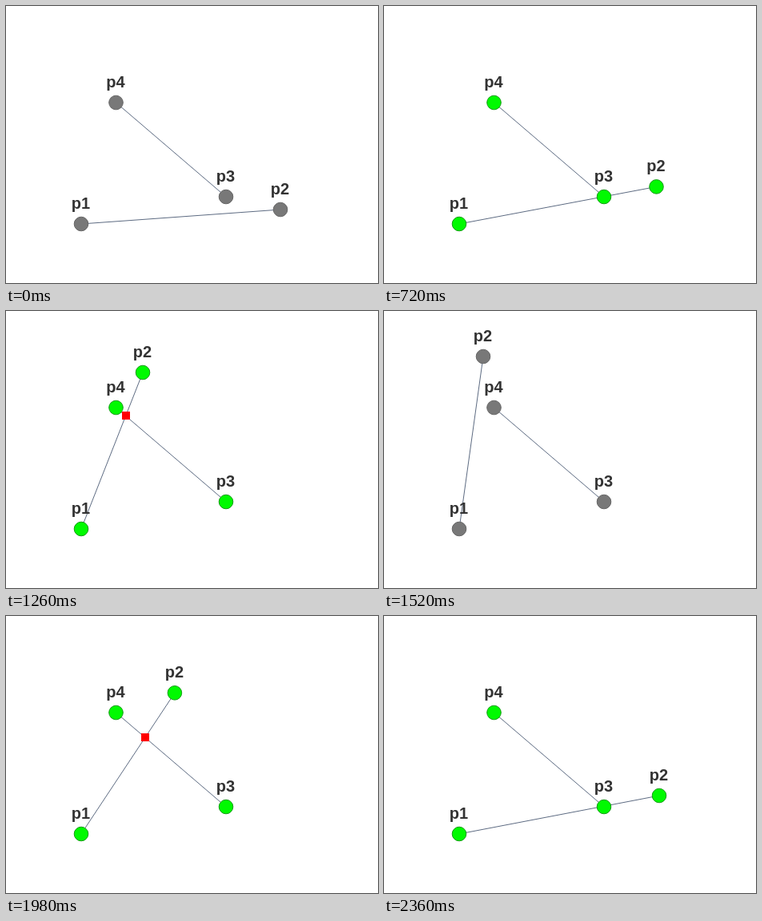
Write an HTML page with a canvas that moves like this. It is 465 px wide and 347 px high and loops after 2.38 s.

```html
<!DOCTYPE html>
<html lang="en">
<head>
<meta charset="utf-8">
<title>Segment intersection</title>
<style>
  html, body { margin: 0; height: 100%; overflow: hidden; background: #fff; }
  canvas { display: block; }
</style>
</head>
<body>
<canvas id="stage" width="465" height="347"></canvas>
<script>
const ctx = document.getElementById('stage').getContext('2d');
const LOOP = 2380, STEP = 20;
const p1 = [94, 273], p3 = [275, 239], p4 = [137.5, 121];

// Path of the dragged point: time, x, y
const drag = [
  [540, 343, 255], [640, 344, 244], [720, 340.5, 226.4], [1020, 265, 136],
  [1080, 242, 113], [1260, 171, 77], [1520, 124, 57], [1660, 124, 57],
  [1820, 137, 62.4], [2140, 304, 150], [2200, 322, 171], [2360, 344, 225]
];

const slope = (i, axis) =>
  (drag[i + 1][axis] - drag[i][axis]) / (drag[i + 1][0] - drag[i][0]);

// Harmonic mean of the neighbouring slopes avoids overshoot
function tangent(i, axis) {
  if (i === 0) return 0;
  const a = slope(i - 1, axis);
  if (i === drag.length - 1) return a;
  const b = slope(i, axis);
  return a * b > 0 ? 2 * a * b / (a + b) : 0;
}

function dragAt(t) {
  if (t <= drag[0][0]) return drag[0].slice(1);
  const last = drag.length - 1;
  if (t >= drag[last][0]) return drag[last].slice(1);
  const i = drag.findIndex(key => key[0] > t) - 1;
  const span = drag[i + 1][0] - drag[i][0];
  const u = (t - drag[i][0]) / span, v = 1 - u;
  return [1, 2].map(axis =>
    drag[i][axis] * v * v * (1 + 2 * u) +
    drag[i + 1][axis] * u * u * (3 - 2 * u) +
    span * u * v * (v * tangent(i, axis) - u * tangent(i + 1, axis)));
}

function intersection(a, b, c, d) {
  const [rx, ry] = [b[0] - a[0], b[1] - a[1]];
  const [sx, sy] = [d[0] - c[0], d[1] - c[1]];
  const [qx, qy] = [c[0] - a[0], c[1] - a[1]];
  const cross = rx * sy - ry * sx;
  const u = (qx * sy - qy * sx) / cross;
  const v = (qx * ry - qy * rx) / cross;
  const inside = u >= 0 && u <= 1 && v >= 0 && v <= 1;
  return inside ? [a[0] + u * rx, a[1] + u * ry] : null;
}

function line(a, b) {
  ctx.strokeStyle = '#5d6b82';
  ctx.beginPath();
  ctx.moveTo(...a);
  ctx.lineTo(...b);
  ctx.stroke();
}

function dot([x, y], name, hit) {
  ctx.fillStyle = hit ? '#00fa00' : '#787878';
  ctx.strokeStyle = hit ? '#159a15' : '#666';
  ctx.beginPath();
  ctx.arc(x, y, 8.8, 0, 2 * Math.PI);
  ctx.fill();
  ctx.stroke();
  ctx.fillStyle = '#333';
  ctx.fillText(name, x - 0.5, y - 19);
}

function draw(t) {
  ctx.fillStyle = '#fff';
  ctx.fillRect(0, 0, 465, 347);
  ctx.lineWidth = 1;
  ctx.font = 'bold 20px "Liberation Sans", Arial, sans-serif';
  ctx.textAlign = 'center';

  const p2 = dragAt(t);
  const hit = intersection(p1, p2, p3, p4);
  line(p1, p2);
  line(p3, p4);
  if (hit) {
    ctx.fillStyle = '#f00';
    ctx.fillRect(Math.round(hit[0]) - 5, Math.round(hit[1]) - 5, 10, 10);
  }
  [p1, p2, p3, p4].forEach((p, i) => dot(p, 'p' + (i + 1), hit));
}

const start = performance.now();
function frame() {
  const t = (performance.now() - start) % LOOP;
  draw(Math.floor(t / STEP) * STEP);
  requestAnimationFrame(frame);
}
frame();
</script>
</body>
</html>
```
